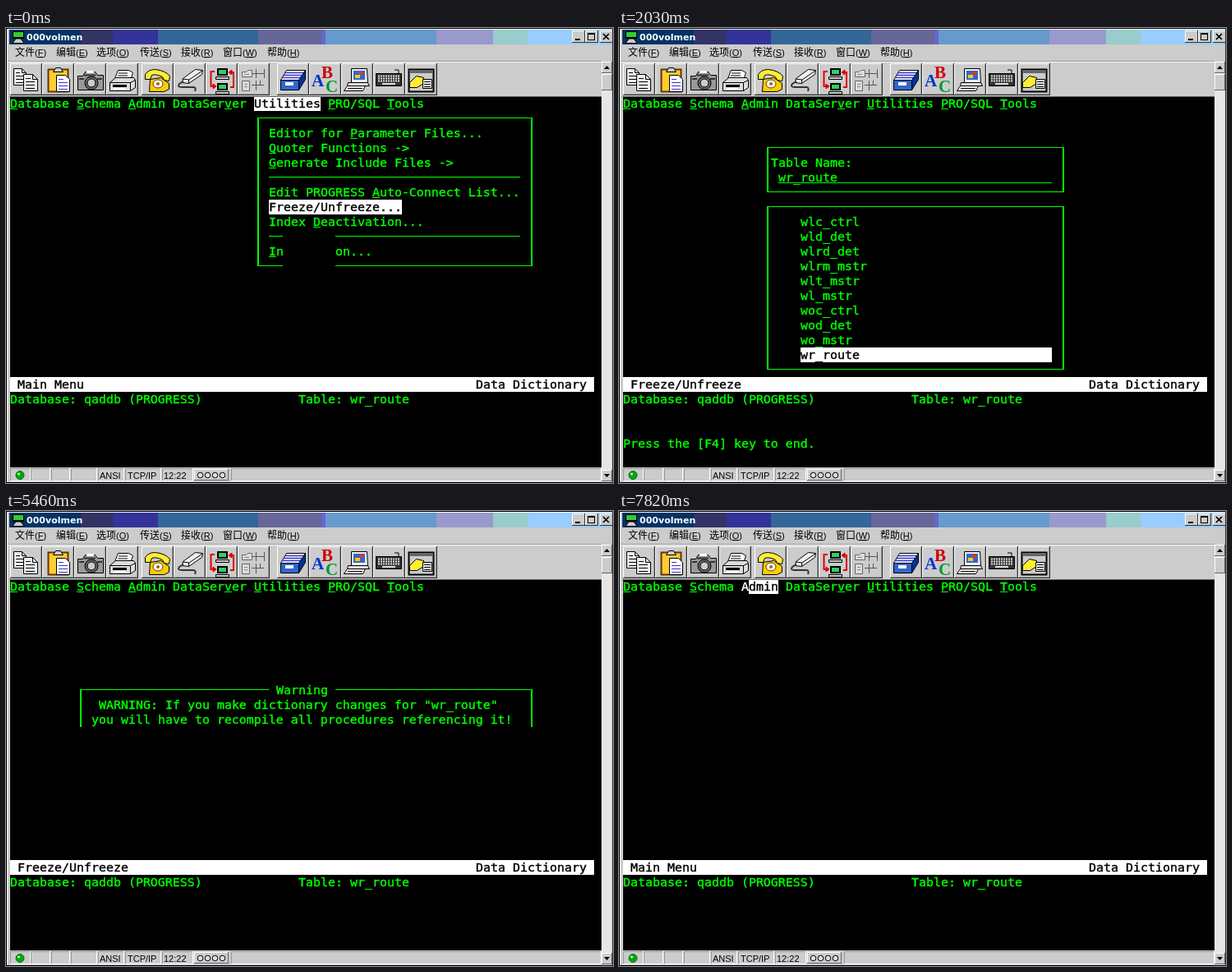
An HTML page for the animation above (8 s loop, 739 px wide and 554 px high).

```html
<!DOCTYPE html>
<html lang="zh">
<head>
<meta charset="utf-8">
<title>Terminal</title>
<style>
  html, body { margin: 0; width: 100%; height: 100%; overflow: hidden; background: #ccc; }
  svg { display: block; width: 739px; height: 554px; }
  rect, .crisp { shape-rendering: crispEdges; }
  text { white-space: pre; }
  .term { font: 14.95px "DejaVu Sans Mono", monospace; stroke-width: .4; }
  .ui { font: 11px "Liberation Sans", Arial, sans-serif; }
  .menu { font: 12px "Noto Sans CJK SC", "Noto Sans CJK", sans-serif; }
  .menu .ui { font-size: 11px; }
  .title { font: bold 11px "DejaVu Sans", sans-serif; }
  .abc { font: bold 21px "Liberation Serif", serif; }
</style>
</head>
<body>
<svg id="stage" viewBox="0 0 739 554"></svg>
<script>
const GREEN = '#0f0', WHITE = '#fff', BLACK = '#000', PINK = '#f0f', FACE = '#ccc';
const LOOP = 8000;

const esc = s => s.replace(/&/g, '&amp;').replace(/</g, '&lt;').replace(/>/g, '&gt;');
const rect = (x, y, w, h, fill) => `<rect x="${x}" y="${y}" width="${w}" height="${h}" fill="${fill}"/>`;
const path = (d, fill = 'none', stroke = BLACK, w = 1) =>
  `<path d="${d}" fill="${fill}" stroke="${stroke}" stroke-width="${w}"/>`;
const label = (x, y, s, cls, fill = BLACK) => `<text x="${x}" y="${y}" class="${cls}" fill="${fill}">${esc(s)}</text>`;
const bevel = (x, y, w, h, hi = WHITE, lo = '#666') =>
  rect(x, y, w, h, lo) + rect(x, y, w - 1, h - 1, hi) + rect(x + 1, y + 1, w - 2, h - 2, FACE);

/* ---------- terminal: 9 x 18 px cells ---------- */
const X = c => 5 + 9 * c, Y = r => 83 + 18 * r;

const cells = (c, r, n, fill) => {
  const y = Math.max(84, Y(r));
  return rect(X(c), y, 9 * n, Y(r + 1) - y, fill);
};
const line = (c, r, n, fill = GREEN) => rect(X(c), Y(r) + 15, 9 * n, 1, fill);
const say = (c, r, s, fill = GREEN) =>
  `<text class="term" x="${X(c)}" y="${Y(r) + 14}" fill="${fill}" stroke="${fill}">${esc(s)}</text>`;
const mark = (c, r, s, n = s.length) => cells(c, r, n, WHITE) + say(c, r, s, BLACK);

// "&" stands before the underlined letter
const key = (c, r, s) => {
  const i = s.indexOf('&');
  return say(c, r, s.replace('&', '')) + (i < 0 ? '' : line(c + i, r, 1));
};
const rule = (c, r, n) => rect(X(c), Y(r) + 8, 9 * n, 1, GREEN);
const side = (c, y1, y2) => rect(X(c) + 4, y1, 2, y2 - y1, GREEN);
const edge = (c1, c2, r) => rect(X(c1) + 4, Y(r) + 8, 9 * (c2 - c1) + 2, 1, GREEN);
const frame = (c1, r1, c2, r2) =>
  edge(c1, c2, r1) + edge(c1, c2, r2) +
  side(c1, Y(r1) + 8, Y(r2) + 9) + side(c2, Y(r1) + 8, Y(r2) + 9);

const cursor = (c, r, ch = ' ') => cells(c, r, 1, WHITE) + say(c, r, ch, PINK) + line(c, r, 1, PINK);
const cursorOnMark = (c, r, ch) => cells(c, r, 1, BLACK) + say(c, r, ch, WHITE);
const corner = cells(78, 23, 1, WHITE);

function menu(sel) {
  let c = 0, out = '';
  for (const w of ['&Database', '&Schema', '&Admin', 'DataSer&ver', '&Utilities', '&PRO/SQL', '&Tools']) {
    const plain = w.replace('&', '');
    out += plain === sel ? mark(c, 0, plain) : key(c, 0, w);
    c += plain.length + 1;
  }
  return out;
}
const base = (title, sel) =>
  menu(sel) + cells(0, 19, 79, WHITE) + say(1, 19, title, BLACK) + say(63, 19, 'Data Dictionary', BLACK) +
  say(0, 20, 'Database: qaddb (PROGRESS)') + say(39, 20, 'Table: wr_route');

const popup = base('Main Menu', 'Utilities') + frame(33, 1, 70, 11) +
  key(35, 2, 'Editor for &Parameter Files...') + key(35, 3, '&Quoter Functions ->') +
  key(35, 4, '&Generate Include Files ->') + rule(35, 5, 34) +
  key(35, 6, 'Edit PROGRESS &Auto-Connect List...') + mark(35, 7, 'Freeze/Unfreeze...') +
  key(35, 8, 'Index &Deactivation...') + rule(35, 9, 34) +
  key(35, 10, '&In       on...') + rect(337, 246, 64, 52, BLACK);

const freeze = base('Freeze/Unfreeze');
const pressKey = say(0, 23, 'Press the [F4] key to end.');
const field = frame(19, 3, 59, 6) + say(20, 4, 'Table Name:') + say(21, 5, 'wr_route') + line(21, 5, 37);
const list = frame(19, 7, 59, 18) +
  ['wlc_ctrl', 'wld_det', 'wlrd_det', 'wlrm_mstr', 'wlt_mstr', 'wl_mstr', 'woc_ctrl', 'wod_det', 'wo_mstr']
    .map((s, i) => say(24, 8 + i, s)).join('') + mark(24, 17, 'wr_route', 34);
const picker = freeze + field + list + pressKey;

const dialog = (value, ok) => freeze + frame(18, 8, 61, 14) + mark(29, 8, 'Freeze/Unfreeze Table') +
  say(21, 10, 'Table: wr_route') + say(20, 11, 'Frozen: ' + value) + line(28, 11, 3) +
  (ok ? mark : say)(32, 13, '<OK>') + say(39, 13, '<Cancel>') +
  say(0, 23, 'Enter data or press F4 to end.');

const warnTop = freeze + edge(9, 70, 7) + cells(35, 7, 9, BLACK) + say(36, 7, 'Warning') +
  say(12, 8, 'WARNING: If you make dictionary changes for "wr_route"') +
  say(11, 9, 'you will have to recompile all procedures referencing it!') +
  side(9, Y(7) + 8, Y(10)) + side(70, Y(7) + 8, Y(10));
const warnBox = warnTop + side(9, Y(10), Y(12) + 9) + side(70, Y(10), Y(12) + 9) +
  rule(11, 10, 58) + mark(39, 11, '<OK>') + edge(9, 70, 12);
const warning = warnBox + say(0, 23, 'Press space bar to continue.');

const steps = [
  [0, popup],
  [100, popup + cursorOnMark(35, 7, 'F')],
  [630, freeze + corner],
  [840, freeze + field + list],
  [950, picker],
  [1490, picker + cursor(29, 5)],
  [2030, picker],
  [2130, freeze + pressKey + corner],
  [2230, dialog('yes')],
  [2770, dialog('no') + cursor(29, 11, 'o')],
  [3310, dialog('no')],
  [3850, dialog('no') + cursor(29, 11, 'o')],
  [4390, dialog('no') + corner],
  [4490, dialog('no', true)],
  [5030, freeze],
  [5460, warnTop],
  [5560, warnBox],
  [5660, warning],
  [6090, warning + cursorOnMark(39, 11, '<')],
  [6630, menu() + corner],
  [7060, base('Main Menu')],
  [7170, base('Main Menu', 'Utilities')],
  [7710, base('Main Menu', 'DataServer') + cursorOnMark(22, 0, 'D')],
  [7820, base('Main Menu', 'Admin') + cursorOnMark(16, 0, 'A')]
];

/* ---------- window ---------- */
function titleBar() {
  const bands = [[4, '#036'], [91, '#336'], [130, '#339'], [185, '#369'], [307, '#669'], [384, '#66c'],
    [389, '#69c'], [524, '#99c'], [593, '#9cc'], [635, '#9cf'], [738, '']];
  let out = '';
  for (let i = 0; i < bands.length - 1; i++)
    out += rect(bands[i][0], 2, bands[i + 1][0] - bands[i][0], 18, bands[i][1]);
  out += rect(8, 4, 14, 9, BLACK) + rect(9, 5, 12, 6, '#3c3') + path('M8 18.5L12 13H18L22 18.5Z', FACE);
  out += label(25, 15, '000volmen', 'title', WHITE);
  for (const x of [689, 705, 723]) out += bevel(x, 3, 16, 15, WHITE, '#333');
  return out + rect(693, 13, 6, 2, BLACK) + rect(708, 6, 9, 9, BLACK) + rect(709, 8, 7, 6, FACE) +
    path('M727 7L734 14M734 7L727 14', 'none', BLACK, 1.7);
}

const menuBar = [[11, '文件', 'F'], [61, '编辑', 'E'], [110, '选项', 'O'], [163, '传送', 'S'],
  [213, '接收', 'R'], [264, '窗口', 'W'], [318, '帮助', 'H']].map(([x, s, k]) =>
  `<text x="${x}" y="34" class="menu">${s}<tspan class="ui" x="${x + 24}">(<tspan text-decoration="underline">${k}</tspan>)</tspan></text>`
).join('');

const monitor = (x, y) => rect(x, y, 13, 9, BLACK) + rect(x + 2, y + 2, 9, 5, '#3c6') +
  path(`M${x - 2}.5 ${y + 13}.5v-3h16v3z`, FACE);
const icons = [
  [5, path('M4.5 6.5h10l5 5v15h-15z', '#eee') + path('M14.5 6.5v5h5M7 11.5h5M7 15.5h9M7 19.5h9M7 23.5h9') +
    path('M16.5 13.5h11l6 6v14h-17z', '#eee') + path('M27.5 13.5v6h6M19 18.5h6M19 22.5h11M19 26.5h11M19 30.5h11')],
  [44, path('M7.5 7.5h24v27h-24z', '#fc3', '#630', 2) + path('M13.5 10.5l3-5h6l3 5z', FACE) +
    path('M17.5 14.5h11l5 5v15h-16z', WHITE) + path('M20 19.5h6M20 23.5h11M20 27.5h11M20 31.5h11', 'none', '#33c')],
  [83, path('M4.5 15.5h6l3-5h12l3 4h7v18h-31z', '#999') + path('M12 14.5h14M6 19h6M28 19h6', 'none', '#333', 2) +
    '<circle cx="21" cy="24" r="8" fill="#666" stroke="#000"/><circle cx="21" cy="24" r="5" fill="#ccc" stroke="#000"/>' +
    rect(15, 9, 9, 3, WHITE)],
  [122, path('M10.5 18.5l4-10h13l5 3-3 9z', WHITE) + path('M15 12h11M14 15h12') +
    path('M4.5 23.5l7-6h22l2 3v9l-6 4h-25z', '#ddd') + path('M4.5 23.5h25l6-3M29.5 23.5v10') +
    path('M8 27.5h17', 'none', BLACK, 3) + path('M9 31h14', 'none', WHITE, 2)],
  [165, path('M10.5 19.5l13-2 10 7v7l-6 3h-18z', '#fc0') +
    path('M4.5 13.5q4-6 12-6q12 1 18 8l-1 6-6-1-2-4q-8-4-13-2l-2 5h-6z', '#fe3') +
    '<ellipse cx="20" cy="25" rx="6" ry="5" fill="#fff" stroke="#630"/><circle cx="20" cy="25" r="2" fill="#960"/>'],
  [204, path('M11.5 18.5l15-11 9 1-1 5-16 11-8-1z', '#eee') + path('M11 19l8 1 16-11M18.5 20v4') +
    path('M12 22l-5 3q-3 4 3 4h14q4 0 2 5', 'none', '#333', 2)],
  [243, monitor(14, 6) + monitor(14, 24) + path('M11 10H6.500V28H10M30 29h4V11h-3', 'none', '#d00', 2) +
    path('M9 25l4 3-4 3zM32 8l-4 3 4 3z', '#d00', '#d00')],
  [282, path('M5.5 10.5h5l2-2h5v8h-12zM5.5 21.5h9v12h-9z', '#ddd', '#666') +
    path('M18 12.500H32M22.500 7V18M32.500 7V18M17 26.500H32M22.500 21V33M27.500 21V26', 'none', '#555') +
    path('M8 25.5h4M8 28.5h4M8 13.500h6', 'none', '#888')],
  [330, path('M4.5 20.5l7-12h23l-6 12z', WHITE) + path('M10 11.5h22M8 14.5h22M6 17.5h23', 'none', '#33c', 1.5) +
    path('M4.500 20.500h22v12h-22z', '#36c') + path('M26.500 20.500l8-12v11l-8 13z', '#039') +
    rect(10, 23, 10, 4, WHITE)],
  [369, label(3, 28, 'A', 'abc', '#03c') + label(15, 18, 'B', 'abc', '#c00') + label(20, 35, 'C', 'abc', '#093')],
  [408, path('M12.500 6.500h19l1 17h-20z', '#eee') + rect(15, 9, 14, 11, '#36c') + rect(17, 14, 6, 4, '#fc0') +
    rect(22, 10, 5, 4, '#d33') + path('M8.500 23.500h24l2 4h-27z', '#ddd') + path('M3.500 33.500l4-6h22l-3 6z', '#eee') +
    path('M8 30.500h18', 'none', BLACK, 1)],
  [447, path('M3.500 12.500h31v15h-31z', '#333') + path('M31 12V8H26', 'none') +
    [15, 18, 21].map(y => `<path d="M6 ${y}.5h27" stroke="#ddd" stroke-width="2" stroke-dasharray="2 1"/>`).join('') +
    path('M11 25h16', 'none', '#ddd', 2)],
  [486, path('M4.500 7.500h30v27h-30z', FACE, BLACK, 2) + rect(5, 8, 29, 4, '#666') +
    path('M5.500 23.500l8-8 9 2v7l-8 5h-9z', '#fe3') + path('M21.500 19.500h11v11h-11z', '#eee') +
    path('M23 22.500h8M23 25.500h8M23 28.500h8')]
];
const toolBar = icons.map(([x, art]) =>
  bevel(x, 43, 39, 39, WHITE, '#333') + rect(x + 37, 44, 1, 37, '#999') + rect(x + 1, 80, 37, 1, '#999') +
  `<g transform="translate(${x} 43)">${art}</g>`).join('');

const scrollBar = rect(725, 41, 13, 512, '#e6e6e6') + bevel(725, 41, 13, 14) + bevel(725, 56, 13, 20) +
  bevel(725, 538, 13, 14) + path('M728 50h7l-3.500-4z', BLACK, 'none') + path('M728 543h7l-3.500 4z', BLACK, 'none');

const sunk = (x, w) => bevel(x, 536, w, 16, '#999', WHITE);
const statusBar = [[5, 25], [30, 24], [55, 23], [79, 32], [112, 32], [145, 44], [190, 38], [274, 451]]
  .map(a => sunk(...a)).join('') + bevel(229, 537, 42, 14, WHITE, '#666') +
  '<circle cx="17" cy="544.500" r="5" fill="#0a0" stroke="#063"/><circle cx="15.500" cy="543" r="1.500" fill="#cfc"/>' +
  [236.5, 245.5, 254.5, 263.5].map(x => `<circle cx="${x}" cy="544.500" r="3.300" fill="#ddd" stroke="#000"/>`).join('') +
  label(114, 549, 'ANSI', 'ui') + label(148, 549, 'TCP/IP', 'ui') + label(192, 549, '12:22', 'ui');

const shell = rect(0, 0, 739, 554, FACE) + rect(0, 0, 739, 1, BLACK) + rect(0, 0, 1, 554, BLACK) +
  rect(1, 1, 737, 1, WHITE) + rect(1, 1, 1, 552, WHITE) + rect(738, 0, 1, 554, '#333') + rect(0, 553, 739, 1, BLACK) +
  titleBar() + menuBar + rect(2, 40, 723, 1, '#999') + rect(2, 41, 723, 1, WHITE) + toolBar +
  rect(4, 83, 721, 1, '#666') + rect(5, 84, 720, 451, BLACK) + scrollBar + statusBar;

const stage = document.getElementById('stage');
stage.innerHTML = shell + steps.map(([, art]) => `<g class="step" display="none">${art}</g>`).join('');
const views = [...stage.querySelectorAll('.step')];

let shown = -1;
const start = performance.now();
function tick(now) {
  const t = Math.max(0, now - start) % LOOP;
  let i = steps.length - 1;
  while (steps[i][0] > t) i--;
  if (i !== shown) {
    if (shown >= 0) views[shown].setAttribute('display', 'none');
    views[i].removeAttribute('display');
    shown = i;
  }
  requestAnimationFrame(tick);
}
tick(start);
</script>
</body>
</html>
```
